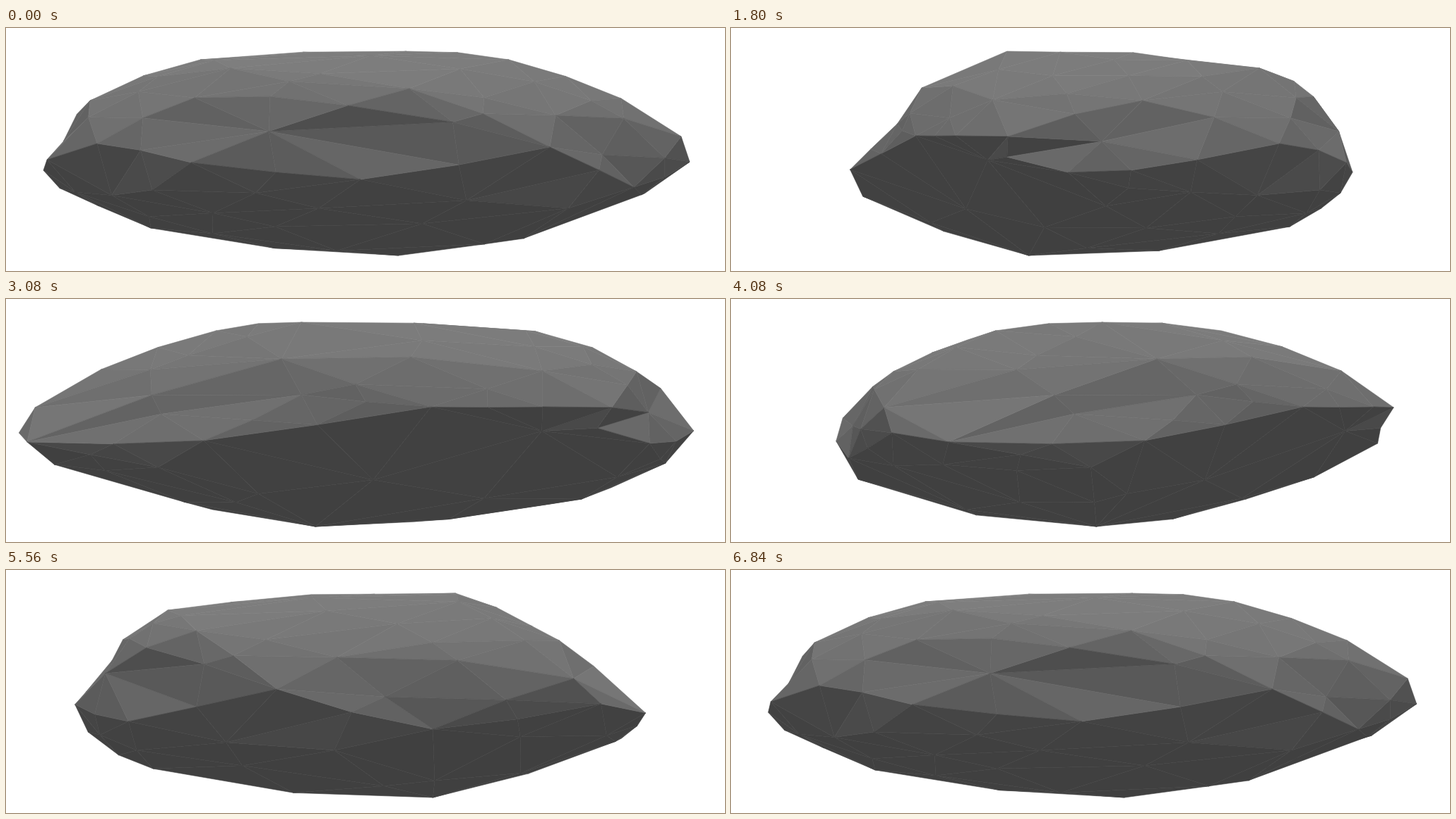
Recreate the animation shown at these times as an HTML page with a canvas. Size 1018x345 px, loop 6880 ms.

```html
<!DOCTYPE html>
<html lang="en">
<head>
<meta charset="utf-8">
<title>Turning rock</title>
<style>
html, body { margin: 0; width: 100%; height: 100%; overflow: hidden; background: #fff; }
canvas { display: block; }
</style>
</head>
<body>
<canvas id="stage" width="1018" height="345"></canvas>
<script>
const stage = document.getElementById('stage');
const ctx = stage.getContext('2d');
const STEP = 40, LOOP = 6880, TURN = 2.1 * Math.PI / 180;
const TOP = 33, BOTTOM = 323, LONG = 150;

// main corners: x from the axis, y on the stage, z towards the viewer
const corners = [
  [58, TOP, -114], [47, BOTTOM, -84], [-234, 45, 15], [203, 45, -60], [-191, 57, 225],
  [-25, 110, 324], [62, 86, 283], [-242, 99, 273], [-390, 103, 43], [-380, 164, 238],
  [-247, 191, 344], [-451, 187, 116], [-7, 215, 359], [261, 169, 240], [287, 256, 163],
  [269, 124, 152], [362, 100, -98], [447, 154, -138], [459, 190, -175], [380, 226, 50],
  [395, 235, -209], [208, 239, -307], [132, 201, -331], [5, 136, -274], [47, 85, -236],
  [-185, 153, -263], [-318, 102, -164], [-336, 153, -218], [-417, 154, -150], [-446, 205, -67],
  [-302, 230, 302], [-128, 282, 273], [-304, 284, 55], [-411, 233, 110], [419, 203, -259]
];

const sum = (a, b) => a.map((v, i) => v + b[i]);
const scale = (a, k) => a.map(v => v * k);
const sub = (a, b) => sum(a, scale(b, -1));
const dot = ([a, b, c], [x, y, z]) => a * x + b * y + c * z;
const cross = ([a, b, c], [x, y, z]) => [b * z - c * y, c * x - a * z, a * y - b * x];
const unit = a => scale(a, 1 / Math.hypot(...a));
const normal = (a, b, c) => cross(sub(b, a), sub(c, a));

// join points as the convex hull of their directions on a unit sphere
function hull(points) {
  const dirs = points.map(([x, y, z]) => unit([x / 470, (y - 178) / 145, z / 350]));
  const faces = [];
  dirs.forEach((a, i) => dirs.forEach((b, j) => j > i && dirs.forEach((c, k) => {
    if (k <= j) return;
    const n = normal(a, b, c), level = dot(n, a), side = Math.sign(level);
    if (dirs.some((d, m) => m !== i && m !== j && m !== k && (dot(n, d) - level) * side > 0)) return;
    faces.push(side < 0 ? [i, k, j] : [i, j, k]);
  })));
  return faces;
}

// split long edges, lifting each middle to follow the curve of the surface
function refine(points) {
  const faces = hull(points);
  const normals = points.map((_, i) => unit(faces.filter(f => f.includes(i))
    .map(f => normal(...f.map(m => points[m]))).reduce(sum)));
  const middles = [];
  for (const f of faces) f.forEach((i, n) => {
    const j = f[n + 1] ?? f[0], edge = sub(points[j], points[i]);
    if (i > j || Math.hypot(...edge) < LONG) return;
    const lift = sub(scale(normals[j], dot(normals[j], edge)), scale(normals[i], dot(normals[i], edge)));
    const [x, y, z] = sum(scale(sum(points[i], points[j]), 0.5), scale(lift, 0.1));
    middles.push([x, Math.min(BOTTOM, Math.max(TOP, y)), z]);
  });
  return points.concat(middles);
}

const points = refine(corners);
const faces = hull(points).map(f => {
  const shape = f.map(m => points[m]), out = unit(normal(...shape));
  const grey = Math.round(64 + 15.5 * (1 - out[1]) ** 2);
  return { shape, out, color: `rgb(${grey},${grey},${grey})` };
});

function draw(now) {
  const angle = Math.floor(now % LOOP / STEP) * TURN;
  const c = Math.cos(angle), s = Math.sin(angle);
  const depth = ([x, , z]) => z * c - x * s;
  const near = f => depth(f.shape.reduce(sum));

  ctx.fillStyle = '#fff';
  ctx.fillRect(0, 0, stage.width, stage.height);
  ctx.lineWidth = 0.6;
  ctx.lineJoin = 'round';
  const seen = faces.filter(f => depth(f.out) > 0).sort((a, b) => near(a) - near(b));
  for (const f of seen) {
    ctx.fillStyle = ctx.strokeStyle = f.color;
    ctx.beginPath();
    for (const [x, y, z] of f.shape) ctx.lineTo(stage.width / 2 + x * c + z * s, y);
    ctx.closePath();
    ctx.fill();
    ctx.stroke();
  }
}

const start = performance.now();
function tick() {
  draw(performance.now() - start);
  requestAnimationFrame(tick);
}
tick();
</script>
</body>
</html>
```
